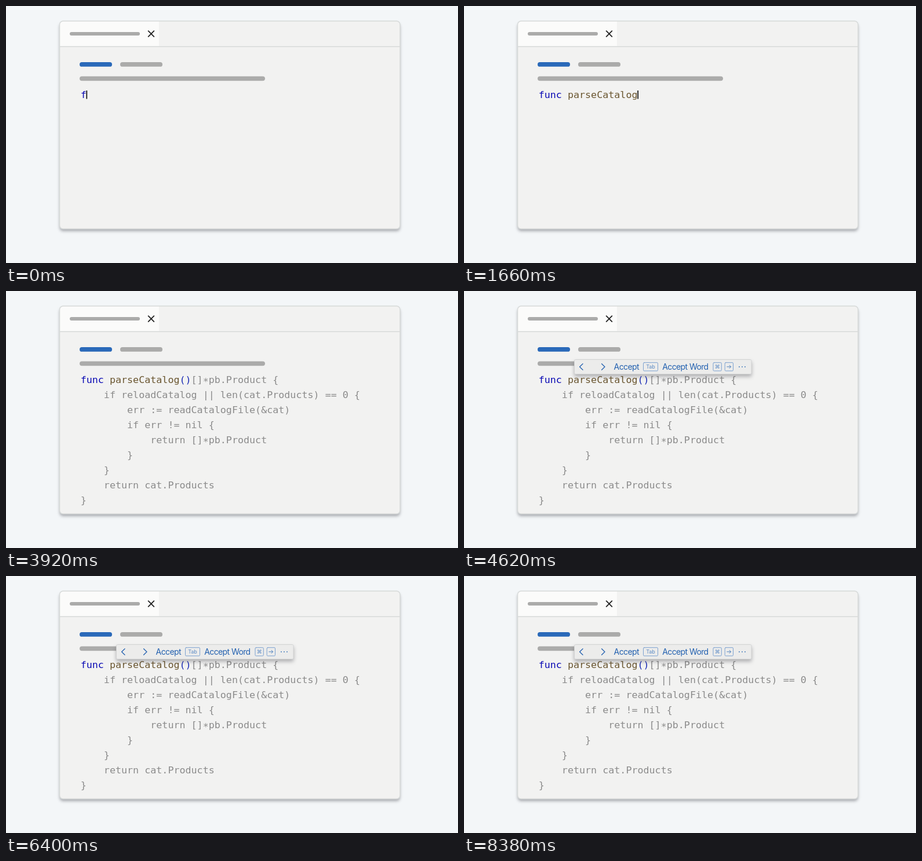
Recreate the animation shown at these times as an HTML page. Size 780 by 444 pixels, loop 8400 ms.

```html
<!DOCTYPE html>
<html lang="en">
<head>
<meta charset="utf-8">
<style>
  html, body { margin: 0; width: 100%; height: 100%; overflow: hidden; background: #f3f6f8; }
  svg { display: block; }
  .code text { font: 16.7px "DejaVu Sans Mono", monospace; white-space: pre; }
  .menu text { font: 14px Inter, sans-serif; letter-spacing: -.6px; fill: #2361b0; }
  .menu .key { font-size: 9px; letter-spacing: 0; fill: #5b8ac4; }
  .menu .cmd { font-family: "DejaVu Sans", sans-serif; }
  .win { filter: drop-shadow(0 4px 2.5px rgba(40, 40, 50, .36)); }
  .menu { filter: drop-shadow(0 4px 3px rgba(40, 40, 50, .32)); }
  .line { fill: none; stroke-linecap: round; stroke-linejoin: round; }
</style>
</head>
<body>
<svg width="780" height="444" viewBox="0 0 780 444">
  <rect class="win" x="92.5" y="26" width="587.5" height="359" rx="6" fill="#f2f2f1"/>
  <path d="M93 69.5V32a6 6 0 0 1 6-6H264V69.5Z" fill="#fbfbfa"/>
  <path d="M93 70.3H680" stroke="#d8dad9" stroke-width="1.6"/>
  <rect x="92.5" y="26" width="587.5" height="359" rx="6" fill="none" stroke="#d7dad9" stroke-width="1.5"/>
  <g fill="#ababaa">
    <rect x="110" y="45" width="121" height="6" rx="3"/>
    <rect x="127" y="97" width="56" height="7.8" rx="3.9" fill="#2a69b9"/>
    <rect x="197" y="97" width="73" height="7.8" rx="3.9"/>
    <rect x="127" y="121.4" width="320" height="7.8" rx="3.9"/>
  </g>
  <path class="line" d="M245.7 43.2L255.3 52.8M255.3 43.2L245.7 52.8" stroke="#252525" stroke-width="1.9"/>

  <g class="code">
    <text id="typed" x="128.7" y="158.8"></text>
    <g id="ghost" fill="#8b8b8b"></g>
    <rect id="caret" y="146" width="1.7" height="14.5" fill="#111"/>
  </g>

  <g class="menu" id="menu">
    <rect x="190.5" y="118.5" width="305.5" height="25" rx="2" fill="#ececeb" stroke="#d2d3d3"/>
    <g class="line" stroke="#2361b0" stroke-width="1.3">
      <path d="M205 125.8L199.6 131L205 136.2M237.6 125.8L243 131L237.6 136.2"/>
    </g>
    <text x="258.6" y="136">Accept</text>
    <text x="342.2" y="136">Accept Word</text>
    <g class="line" stroke="#7ba1d0">
      <rect x="309.5" y="123.7" width="25" height="14.3" rx="1.5"/>
      <rect x="430" y="123.7" width="14.3" height="14.3" rx="1.5"/>
      <rect x="450.2" y="123.7" width="14.3" height="14.3" rx="1.5"/>
      <path d="M453.8 130.9H460.6M458 128.3L460.6 130.9L458 133.5" stroke="#4d80be"/>
    </g>
    <text class="key" x="322" y="134.3" text-anchor="middle">Tab</text>
    <text class="key cmd" x="437.2" y="134.3" text-anchor="middle">⌘</text>
    <g fill="#4d80be">
      <circle cx="475" cy="131" r="1"/><circle cx="480" cy="131" r="1"/><circle cx="485" cy="131" r="1"/>
    </g>
  </g>
</svg>
<script>
const LOOP = 8400, ADVANCE = 10.054, LEFT = 128.7;
const GHOST_AT = 3400, MENU_AT = 4080, FADE = 200;
const parts = [["func ", "#0808b4"], ["parseCatalog", "#6a5630"], ["()", "#1a2bb4"]];
const total = parts.reduce((n, [s]) => n + s.length, 0);
const lines = [
  " ".repeat(total) + "[]*pb.Product {",
  "    if reloadCatalog || len(cat.Products) == 0 {",
  "        err := readCatalogFile(&amp;cat)",
  "        if err != nil {",
  "            return []*pb.Product",
  "        }",
  "    }",
  "    return cat.Products",
  "}"
];
const [typed, ghost, caret, menu] =
  ["typed", "ghost", "caret", "menu"].map(id => document.getElementById(id));

// The asterisk sits at mid height.
ghost.innerHTML = lines.map((s, i) =>
  `<text x="${LEFT}" y="${158.8 + i * 26}">${
    s.replace(/\*(.)/, '<tspan dy="3">*</tspan><tspan dy="-3">$1</tspan>')}</text>`).join("");

let shown = 0;
function type(count) {
  if (count === shown) return;
  shown = count;
  let rest = count;
  typed.innerHTML = parts.map(([s, color]) => {
    const piece = s.slice(0, Math.max(0, rest));
    rest -= s.length;
    return `<tspan fill="${color}">${piece}</tspan>`;
  }).join("");
  caret.setAttribute("x", LEFT + count * ADVANCE - .3);
}

const fade = (t, start) => Math.min(1, Math.max(0, (t - start) / FADE));

function draw(now) {
  const t = now % LOOP;
  type(Math.min(total, 1 + Math.floor((t + 20) / 105)));
  caret.style.opacity = t < GHOST_AT ? 1 : 0;
  ghost.style.opacity = fade(t, GHOST_AT);
  menu.style.opacity = fade(t, MENU_AT);
}

const start = performance.now();
function tick() {
  draw(performance.now() - start);
  requestAnimationFrame(tick);
}
tick();
</script>
</body>
</html>
```
